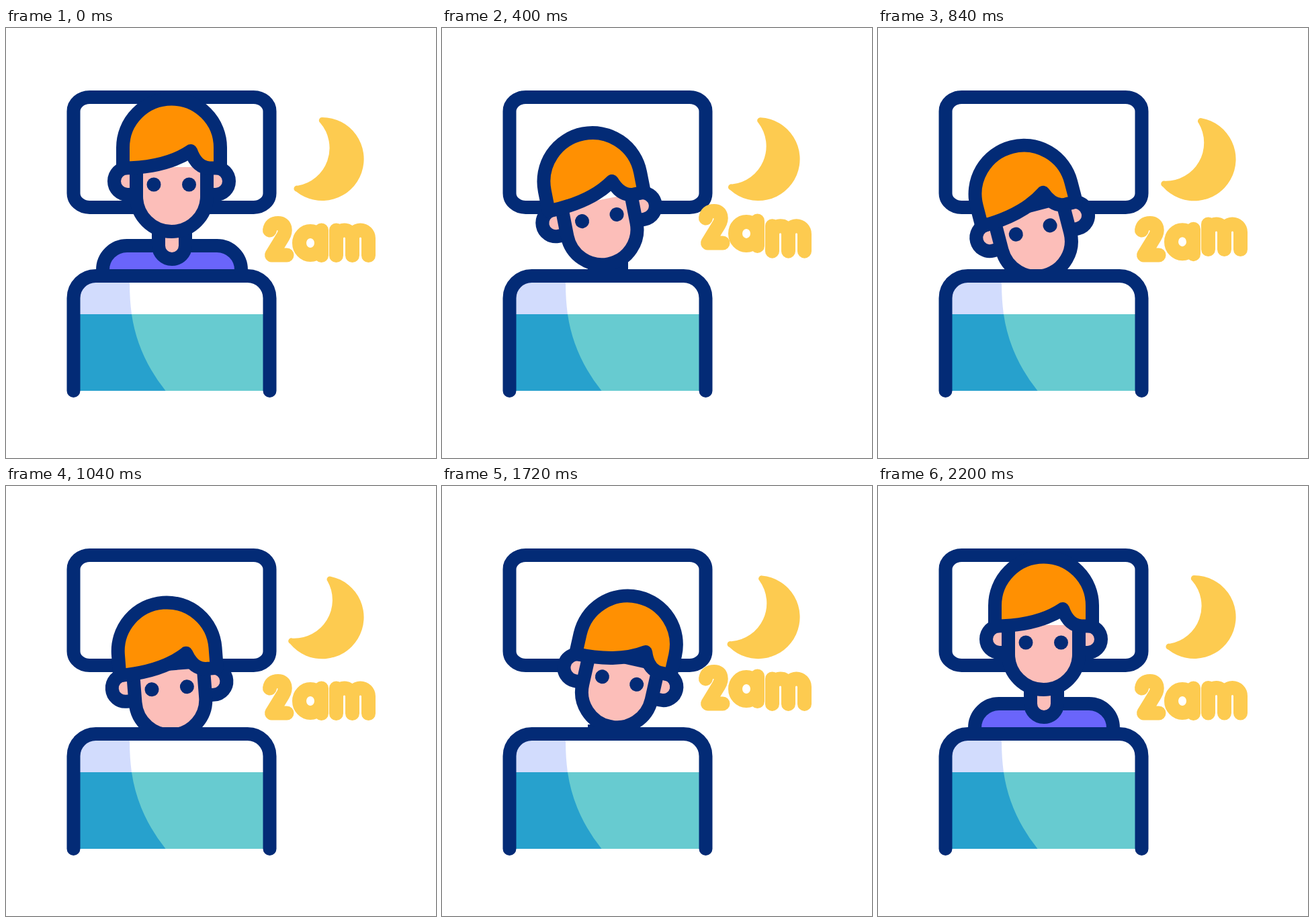
These frames come from a looping animation (640x640 px, 2.24 s). An HTML page:

```html
<!DOCTYPE html>
<html lang="en">
<head>
<meta charset="utf-8">
<title>Awake at 2am</title>
<style>
  html, body { margin: 0; width: 100%; height: 100%; overflow: hidden; background: #fff; }
  svg { display: block; width: 100vw; height: 100vh; }
  .line { stroke: #032b76; stroke-width: 20; stroke-linejoin: round; }
  .skin { fill: #fcbeb9; }
  .glyph { fill: none; stroke: #fdcb50; stroke-width: 21; stroke-linecap: round; stroke-linejoin: round; }
</style>
</head>
<body>
<svg viewBox="0 0 640 640" role="img" aria-label="2am">
  <rect class="line" x="100.5" y="103" width="292" height="164" rx="24" ry="21" fill="#fff"/>

  <g id="body">
    <path class="line" fill="#6a65fb" d="M144 400V360A36 36 0 0 1 180 324H314A36 36 0 0 1 350 360V400"/>
    <path class="line skin" d="M227 300V324A20 20 0 0 0 267 324V300"/>
  </g>

  <g id="head">
    <path class="line skin" d="M194 208H181A20 20 0 0 0 181 248H194"/>
    <path class="line skin" d="M299 208H312A20 20 0 0 1 312 248H299"/>
    <path class="line skin" d="M194 207V250.5A52.5 52.5 0 0 0 299 250.5V207"/>
    <path class="line" fill="#ff9002" d="M174 208.5V178A72.5 72.5 0 0 1 319 178V208.5H303Q284 208 275 183Q238 208 174 208.5Z"/>
    <g fill="#032b76">
      <circle cx="220" cy="233" r="10.5"/>
      <circle cx="272.5" cy="233" r="10.5"/>
    </g>
  </g>

  <path fill="#fff" d="M100.5 540V402A33 33 0 0 1 133.500 369H359A33 33 0 0 1 392.500 402V540Z"/>
  <path fill="#d2dcfd" d="M100.5 426V402A33 33 0 0 1 133.500 369H184V380Q184 404 187 426Z"/>
  <path fill="#67cbd0" d="M100.5 426H392.500V540H100.5Z"/>
  <path fill="#27a1cd" d="M100.5 426H187Q196 488 237.500 540H100.5Z"/>
  <path class="line" fill="none" stroke-linecap="round" d="M100.5 540V402A33 33 0 0 1 133.500 369H359.500A33 33 0 0 1 392.500 402V540"/>

  <path id="moon" fill="#fdcb50" d="M470.500 133A62 62 0 1 1 432 243.500A4.500 4.500 0 0 1 434 234.700A57 57 0 0 0 467.500 141A4.500 4.500 0 0 1 470.500 133Z"/>

  <path class="glyph" d="M392.500 301Q394 290.500 405 290.500C417 290.500 417 303 412 311L395.500 338H418"/>
  <path class="glyph" d="M469.500 301V338.500M469.500 320A16.500 17.500 0 1 1 436.500 320A16.500 17.500 0 1 1 469.500 320"/>
  <path class="glyph" d="M491.500 301V338.500M491.500 313A12 12 0 0 1 515.500 313V338.500M515.500 313A12 12 0 0 1 539.500 313V338.500"/>
</svg>
<script>
  const LOOP = 2240, STEP = 40;
  const body = document.getElementById('body');
  const head = document.getElementById('head');
  const moon = document.getElementById('moon');
  const glyphs = document.querySelectorAll('.glyph');

  // Smooth progress from 0 to 1 between two times
  function ease(t, start, end) {
    const u = Math.min(1, Math.max(0, (t - start) / (end - start)));
    return u * u * (3 - 2 * u);
  }

  function hop(t, start) {
    return 18 * (ease(t, start, start + 400) - ease(t, start + 400, start + 800));
  }

  function draw(t) {
    const sink = ease(t, 0, 600);
    const turn = ease(t, 800, 1400);
    const rise = ease(t, 1560, 2200);

    const out = sink * (1 - rise);
    const drop = 65.3 * out + 10 * turn * (1 - turn);
    const tilt = (-15 + 30 * turn) * out;
    const shift = 5 * turn * out;
    body.setAttribute('transform', `translate(0 ${drop})`);
    head.setAttribute('transform', `translate(${shift} ${drop}) rotate(${tilt} 246.5 295)`);

    const swing = 6 * (1 - Math.cos(2 * Math.PI * t / LOOP));
    moon.setAttribute('transform', `rotate(${swing} 469 195)`);

    glyphs.forEach((glyph, i) => {
      const delay = 120 * i;
      const lift = hop(t, delay) + hop(t, 1200 + delay);
      glyph.setAttribute('transform', `translate(0 ${-lift})`);
    });
  }

  const begin = performance.now();
  function tick() {
    const t = Math.max(0, performance.now() - begin) % LOOP;
    draw(Math.floor(t / STEP) * STEP);
    requestAnimationFrame(tick);
  }
  draw(0);
  requestAnimationFrame(tick);
</script>
</body>
</html>
```
